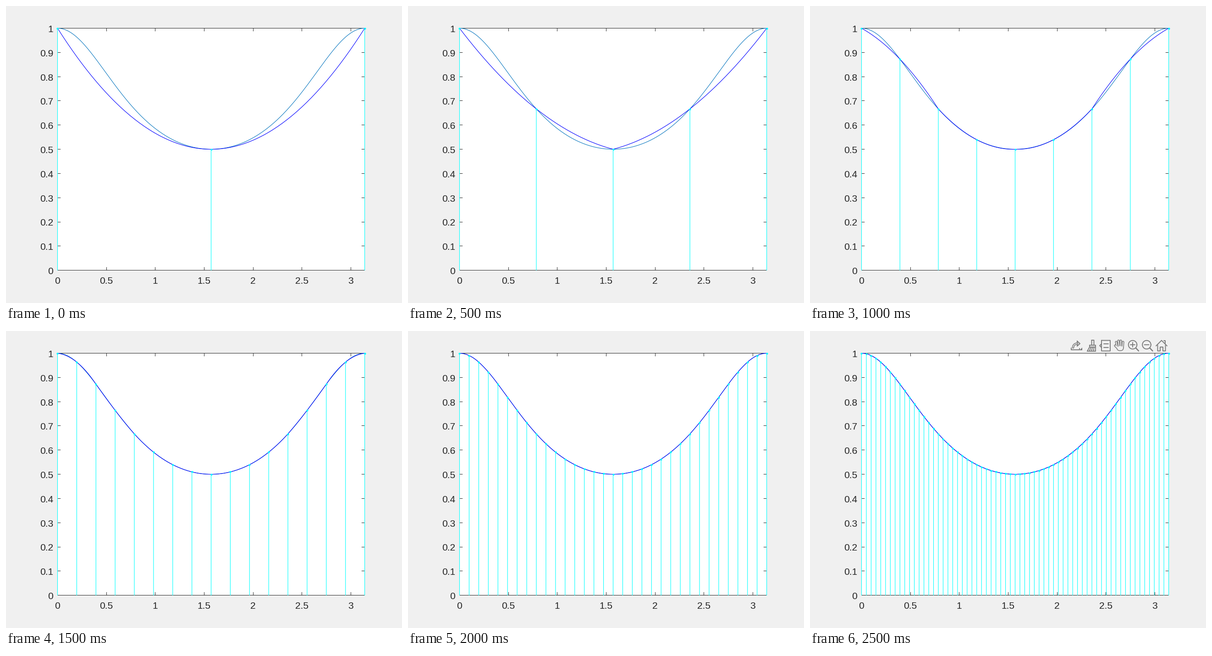
A matplotlib script for the animation above (3 s loop, 864 px wide and 648 px high).

```python
import numpy as np
import matplotlib.pyplot as plt
from matplotlib.animation import FuncAnimation
from matplotlib.collections import LineCollection
from matplotlib.patches import Rectangle

W, H = 864, 648
LEFT, RIGHT, TOP, BOTTOM = 112.45, 782.6, 48.5, 576.6
BACK, INK, GRAY, CYAN = "#f0f0f0", "#262626", "#7b7b7b", "#00ffff"
TICK = 6.7

plt.rcParams["font.family"] = "Liberation Sans"
fig = plt.figure(figsize=(W / 72, H / 72), dpi=72, facecolor=BACK)
ax = fig.add_axes([0, 0, 1, 1])
ax.set_xlim(0, W)
ax.set_ylim(H, 0)
ax.axis("off")


def f(x):
    return 1 / (1 + np.sin(x) ** 2)


def px(x):
    return LEFT + np.asarray(x) * (RIGHT - LEFT) / np.pi


def py(y):
    return BOTTOM - np.asarray(y) * (BOTTOM - TOP)


def pixel(v):
    """Centre of the pixel that holds v."""
    return np.floor(v + 0.05) + 0.5


def line(xs, ys, color=INK, lw=1.0, z=2, cap="butt", **kw):
    return ax.plot(xs, ys, color=color, lw=lw, zorder=z, snap=False,
                   solid_capstyle=cap, **kw)[0]


def label(x, y, value, ha):
    ax.text(x, y, f"{value:g}", size=21, color=INK, ha=ha, va="baseline")


def draw_axes():
    l, r, t, b = pixel(LEFT), pixel(RIGHT), pixel(TOP), pixel(BOTTOM)
    ax.add_patch(Rectangle((l, t), r - l, b - t, fc="white", ec="none", zorder=1))
    for y in (t, b):
        line([l, r], [y, y])
    for v in np.arange(7) / 2:
        x = pixel(px(v))
        line([x, x], [b, b - TICK])
        line([x, x], [t, t + TICK])
        label(px(v) - 0.3, 606.5, v, "center")
    for v in np.arange(11) / 10:
        y = pixel(py(v))
        line([l, l + TICK], [y, y])
        line([r, r - TICK], [y, y])
        label(103, py(v) + 8.5, v, "right")


def draw_toolbar():
    parts = []

    def stroke(xs, ys, lw=1.9, color=GRAY, z=6):
        parts.append(line(xs, ys, color, lw, z, "round"))

    def box(x, y, w, h):
        stroke([x, x + w, x + w, x, x], [y, y, y + h, y + h, y])

    def outline(xs, ys, width):
        stroke(xs, ys, width + 3.2)
        stroke(xs, ys, width, BACK, 7)

    # export: tray, bent arrow, corner mark
    stroke([570, 570, 588, 588], [37, 41, 41, 38])
    a = np.linspace(0, np.pi / 2, 12)
    outline(583 - 9 * np.cos(a), 36 - 8.5 * np.sin(a), 1.5)
    stroke([583, 589, 583, 583], [22, 27.5, 33, 22])
    parts.extend(ax.fill([588, 594, 594], [42, 42, 36], fc=GRAY, ec="none", zorder=6))

    # brush: handle, ferrule, bristles
    box(614.5, 20, 5, 11)
    box(610, 31, 13, 4)
    for s in np.linspace(0, 1, 5):
        stroke([610 + 13 * s, 605 + 18 * s], [35, 44])
    stroke([605, 623], [44, 44])

    # data tips: page with a side pointer
    box(636, 20.5, 19, 23)
    stroke([636, 632, 636], [28, 32, 36])
    for y in (28, 36):
        stroke([641, 651], [y, y])

    # hand: thumb, fanned fingers, palm
    outline([666, 673], [32, 39], 2.2)
    for k in range(4):
        lean = k - 1.5
        outline([675.5 + 5 * lean, 676.5 + 3.8 * lean],
                [21 + 1.4 * lean ** 2, 36], 2)
    outline([675, 678.5], [37.5, 37.5], 9)

    # magnifiers: the first has the upright bar
    a = np.linspace(0, 2 * np.pi, 60)
    for x in (704, 734.5):
        stroke(x + 9.3 * np.cos(a), 30 + 9.3 * np.sin(a))
        stroke([x + 6.8, x + 13], [37, 43.5], 2.4)
        stroke([x - 5, x + 5], [30, 30])
    stroke([704, 704], [25, 35])

    # home: roof, walls, door, chimney
    stroke([755, 767, 779], [32.5, 20.5, 32.5])
    for side in (-1, 1):
        stroke(767 + side * np.array([8.5, 8.5, 3, 3, 0]), [31, 43.5, 43.5, 35, 35])
    stroke([772, 775, 775], [21, 21, 27])
    return parts


def simpson(n):
    """Parabolas through each run of three neighbouring nodes."""
    nodes = np.linspace(0, np.pi, n + 1)
    h = np.pi / n
    t = np.linspace(-1, 1, max(9, 256 // n))
    xs, ys = [], []
    for m in nodes[1::2]:
        a, b, c = f(m - h), f(m), f(m + h)
        xs.append(m + t * h)
        ys.append(b + (c - a) / 2 * t + (a + c - 2 * b) / 2 * t ** 2)
    return nodes, np.concatenate(xs), np.concatenate(ys)


draw_axes()
grid = np.linspace(0, np.pi, 400)
line(px(grid), py(f(grid)), "#0072bd", 1.05, 3)
fit = line([], [], "#0000ff", 1.1, 4)
stems = ax.add_collection(
    LineCollection([], colors=CYAN, linewidths=1.1, zorder=5, snap=False))
dots = line([], [], CYAN, 0, 5.5, marker="o", ms=4.2, mew=0)
toolbar = draw_toolbar()


def update(i):
    nodes, xs, ys = simpson(2 ** (i + 1))
    fit.set_data(px(xs), py(ys))
    cols, tops = px(nodes), py(f(nodes))
    stems.set_segments([[(c, BOTTOM + 0.4), (c, t)] for c, t in zip(cols, tops)])
    dots.set_data(cols, tops)
    for part in toolbar:
        part.set_visible(i == 5)
    return [fit, stems, dots, *toolbar]


anim = FuncAnimation(fig, update, frames=6, interval=500, repeat=True,
                     repeat_delay=0, blit=False)
plt.show()
```
